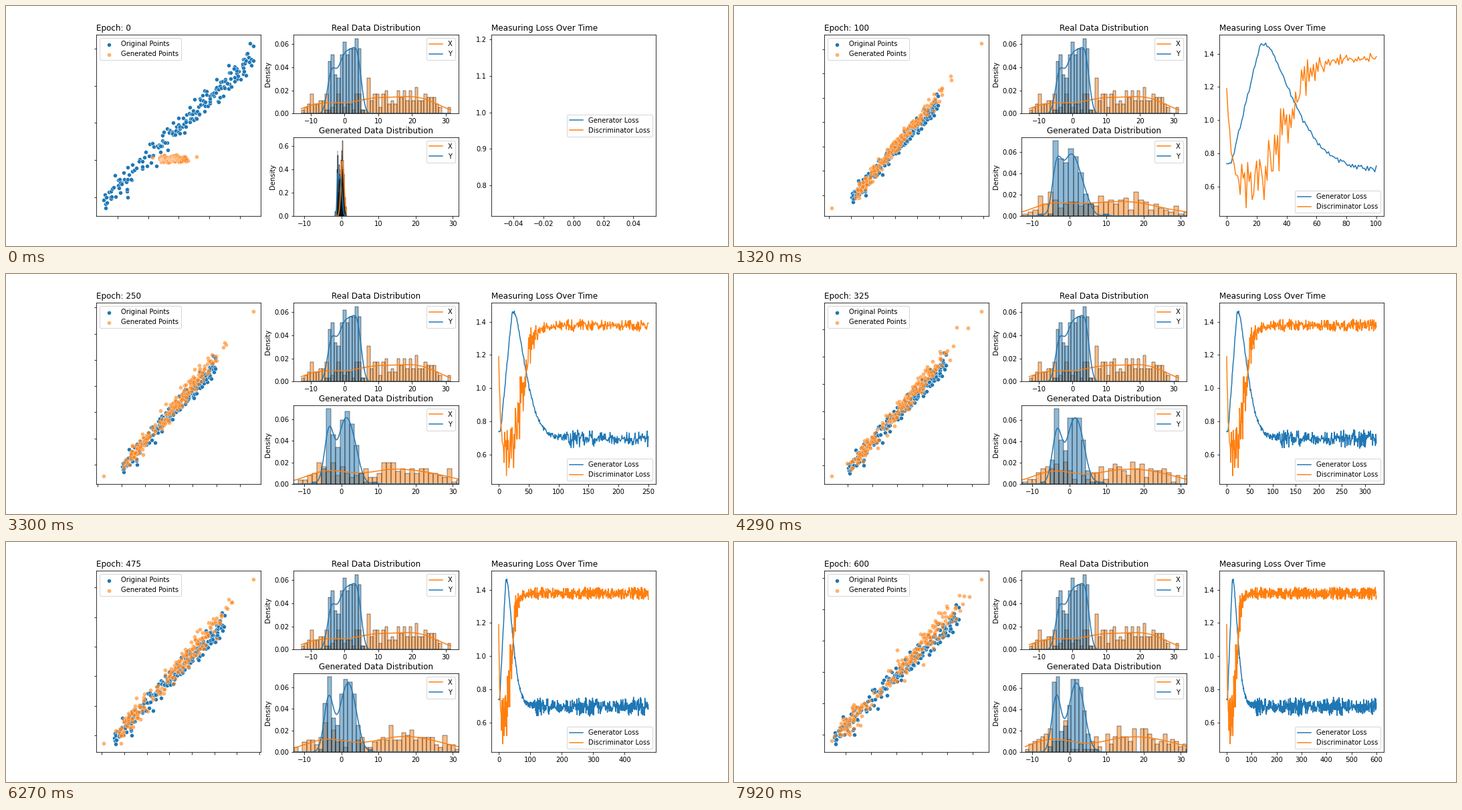
Animation of 1080 by 360 pixels, one loop 8 s. Source, as a matplotlib script:

```python
import numpy as np
import matplotlib.pyplot as plt
from matplotlib.animation import FuncAnimation
from matplotlib.collections import PolyCollection
from matplotlib.colors import to_rgba

plt.rcParams.update({"font.family": "DejaVu Sans", "font.size": 10})

BLUE, ORANGE = "#1f77b4", "#ff7f0e"
N, BINS = 200, 50
LOOP, TICK, HOLD, STEP = 8000, 80, 330, 25
LAST = STEP * (LOOP // HOLD)
LOW, HIGH = -12.85, 31.5


def mix(a, b, t):
    return a + (b - a) * t


def sigmoid(z):
    return 1 / (1 + np.exp(-z))


def line_of(x):
    return 10 + 4.3 * x


def draw_from(density, grid, rng):
    """Stratified sample, so that bars follow the density with some roughness."""
    cdf = np.cumsum(density)
    u = np.clip((np.arange(N) + rng.uniform(-1.5, 2.5, N)) / N, .001, .999)
    return np.interp(u, cdf / cdf[-1], grid)


def fill_bin(x, near, lo, hi, height, rng):
    """Raise the bin around one value to the given density."""
    w = (hi - lo) / BINS
    start = lo + w * np.floor((near - lo) / w)
    offset = x - start - w / 2
    n = round(height * 2 * N * w)
    order = np.argsort(np.abs(offset))
    x[order[:n]] = start + w * rng.uniform(.05, .95, n)
    extra = [i for i in order[n:] if abs(offset[i]) < w / 2]
    x[extra] += np.sign(offset[extra]) * w / 2


def real_points():
    rng = np.random.default_rng(7)
    grid = np.linspace(-4.97, 4.9, 2000)
    dip = .4 * np.exp(-((grid + 2.2) / .8) ** 2)
    x = draw_from(1 + .03 * grid - dip, grid, rng)
    fill_bin(x, 3.5, LOW, HIGH, .065, rng)
    y = line_of(x) + rng.normal(0, 1.9, N)
    return x, np.interp(y, (y.min(), y.max()), (LOW, HIGH))


def generated_points(epoch):
    rng = np.random.default_rng(100 + epoch)
    grow = 1 - (1 - min(epoch / 75, 1)) ** 2
    settle = max(epoch - 100, 0) / (LAST - 100)
    shift = settle ** .5
    x0, x1 = mix(-7.2, -5.1, settle ** 1.5), mix(9.8, 6.7, settle)
    y0, y1 = mix(-15.2, -11.9, settle), mix(52.5, 39.7, settle)

    # narrow left cluster and broad right one, skewed at first
    grid = np.linspace(x0, x1, 2000)
    peak, mode = mix(-3.1, -3.5, settle), mix(-.2, 2, shift)
    left = np.exp(-.5 * ((grid - peak) / .65) ** 2)
    side = np.where(grid < mode, mix(1.6, 2.8, shift), mix(4.6, 2.6, shift))
    right = np.exp(-np.abs((grid - mode) / side) ** 2.5)
    x = draw_from(.32 * left / left.sum() + .68 * right / right.sum(), grid, rng)
    if epoch:
        fill_bin(x, peak, y0, y1, .07, rng)
    x[x.argmin()], x[x.argmax()] = x0, x1

    y = np.maximum(line_of(x), y0 + .8) + rng.normal(0, mix(1.5, 2.1, settle), N)
    y = np.clip(y, y0, y1)
    y[x.argmin()], y[x.argmax()] = y0, y1

    # the untrained generator gives a small flat blob
    return (mix(.17 * x - .5, x, grow),
            mix(rng.normal(.25, .38, N), y, grow))


def losses():
    rng = np.random.default_rng(21)
    t = np.arange(LAST + 1)

    def zigzag(amp):
        return amp * np.tanh(t / 4) * (-1.0) ** t * rng.uniform(-.4, 1, t.size)

    late = sigmoid((t - 105) / 3) * (.75 + .25 * np.cos(2 * np.pi * (t - 118) / 160))
    rise = .738 + .037 * np.maximum(t - 3, 0)
    fall = .695 + .76 * np.exp(-(np.maximum(t - 26, 0) / 26.6) ** 1.5)
    g = np.minimum(rise, fall) + zigzag(.015 + .045 * late)

    d = .57 + .808 * sigmoid((t - 40) / 8) + .615 * np.exp(-t / 3.5)
    d += zigzag(.025 + .015 * late + .22 * np.exp(-((t - 32) / 24) ** 2))
    return t, g, np.clip(d, .467, 1.46)


def kde(data, grid):
    h = data.std(ddof=1) * len(data) ** -.2
    z = (grid[:, None] - data) / h
    return np.exp(-.5 * z * z).sum(1) / (len(data) * h * np.sqrt(2 * np.pi))


class Histogram:
    def __init__(self, ax, title):
        self.ax = ax
        ax.set_title(title)
        ax.set_ylabel("Density")
        self.layers = []
        for color, label in ((ORANGE, "X"), (BLUE, "Y")):
            bars = PolyCollection([], facecolors=[to_rgba(color, .5)],
                                  edgecolors="k", linewidths=.45, zorder=1)
            ax.add_collection(bars, autolim=False)
            line, = ax.plot([], [], color=color, label=label)
            self.layers.append((bars, line))
        ax.legend(loc="upper right")

    def show(self, wide, narrow):
        both = np.concatenate([wide, narrow])
        edges = np.linspace(both.min(), both.max(), BINS + 1)
        grid = np.linspace(both.min(), both.max(), 200)
        a, b = edges[:-1], edges[1:]
        top = 0
        for data, (bars, line) in zip((wide, narrow), self.layers):
            # both groups share one unit of area
            h = np.histogram(data, edges)[0] / (2 * N * (b[0] - a[0]))
            o = np.zeros(BINS)
            bars.set_verts(np.stack([np.c_[a, o], np.c_[b, o],
                                     np.c_[b, h], np.c_[a, h]], axis=1))
            curve = kde(data, grid) / 2
            line.set_data(grid, curve)
            top = max(top, h.max(), curve.max())
        self.ax.set_ylim(0, 1.05 * top)


def padded(*arrays):
    lo = min(v.min() for v in arrays)
    hi = max(v.max() for v in arrays)
    pad = .05 * (hi - lo)
    return lo - pad, hi + pad


fig = plt.figure(figsize=(15, 5), dpi=72, facecolor="white")
cells = fig.add_gridspec(2, 3, left=.125, right=.9, bottom=.125, top=.88,
                         wspace=.2, hspace=.3)

rx, ry = real_points()
epochs, g_loss, d_loss = losses()

ax_points = fig.add_subplot(cells[:, 0])
ax_points.tick_params(labelleft=False, labelbottom=False)
dots = dict(s=36, edgecolors="w", linewidths=.48)
ax_points.scatter(rx, ry, color=BLUE, label="Original Points", **dots)
made = ax_points.scatter(rx, ry, color=ORANGE, alpha=.6,
                         label="Generated Points", **dots)
ax_points.legend(loc="upper left")
title = ax_points.set_title("Epoch: 0", loc="left")

real = Histogram(fig.add_subplot(cells[0, 1]), "Real Data Distribution")
real.show(ry, rx)
real.ax.set_xlim(padded(ry))
fake = Histogram(fig.add_subplot(cells[1, 1]), "Generated Data Distribution")
fake.ax.set_xlim(LOW, HIGH)

ax_loss = fig.add_subplot(cells[:, 2])
ax_loss.set_title("Measuring Loss Over Time", loc="left")
g_line, = ax_loss.plot([], [], color=BLUE, label="Generator Loss")
d_line, = ax_loss.plot([], [], color=ORANGE, label="Discriminator Loss")
ax_loss.legend(loc="best")


def update(i):
    epoch = STEP * ((i * TICK + TICK - 1) // HOLD)
    title.set_text(f"Epoch: {epoch}")

    x, y = generated_points(epoch)
    made.set_offsets(np.c_[x, y])
    ax_points.set_xlim(padded(rx, x))
    ax_points.set_ylim(padded(ry, y))
    fake.show(y, x)

    end = epoch + 1
    g_line.set_data(epochs[:end], g_loss[:end])
    d_line.set_data(epochs[:end], d_loss[:end])
    ax_loss.relim()
    ax_loss.autoscale_view()
    return made, g_line, d_line


anim = FuncAnimation(fig, update, frames=LOOP // TICK, interval=TICK,
                     repeat=True, repeat_delay=0, blit=False)
plt.show()
```
